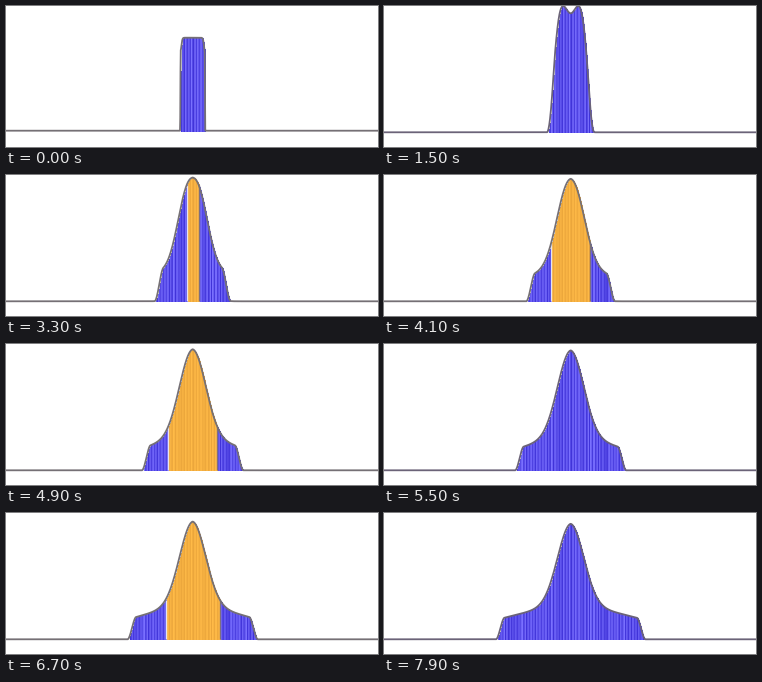
Animation of 372x141 px, one loop 8000 ms. Source, as a matplotlib script:

```python
import numpy as np
import matplotlib.pyplot as plt
from matplotlib.animation import FuncAnimation
from matplotlib.collections import LineCollection

W, H, DPI = 372, 141, 100
FRAMES, INTERVAL = 80, 100
MID = 186.7
START = 0.4
PX = 72 / DPI

BLUE, DARK_BLUE = np.array([0.48, 0.44, 1.0]), np.array([0.25, 0.20, 0.85])
ORANGE, DARK_ORANGE = np.array([1.0, 0.73, 0.28]), np.array([0.92, 0.65, 0.23])
GREY, VIOLET = (0.46, 0.44, 0.46), (0.42, 0.39, 0.47)

curve_x = np.arange(0, W + 0.25, 0.25)
columns_x = np.arange(W) + 0.5

# Fine vertical stripes: a three pixel rhythm with some noise
rng = np.random.default_rng(4)
stripe = 0.5 + 0.3 * np.cos(2 * np.pi * np.arange(W) / 3)
stripe = np.clip(stripe + rng.normal(0, 0.18, W), 0, 1)[:, None]


def pulse(x, t):
    """Height at x: a block that rounds into a bell on a spreading shelf."""
    t = 0 if t < START else t
    d = np.abs(x - MID)

    shelf = 38 + 42 * np.exp(-3 * t)
    rim = min(shelf, 20 + 71 * np.exp(-t / 1.6))
    edge = max(12.3, 7.3 + 8 * t)
    soft = 0.3 + 4 * min(1, t / 1.2)
    k = np.clip((edge + soft - d) / (2 * soft), 0, 1)
    base = (shelf + (rim - shelf) * d / edge) * k * k * (3 - 2 * k)

    peak = np.interp(t, [START, 1, 1.5, 3.3, 7.9], [93, 133, 131, 124, 115.5])
    power = 2 + 18 * np.exp(-1.155 * t)
    width = 18.5 - 7.2 * np.exp(-0.8 * t)
    bell = (peak - shelf) * np.exp(-(d / width) ** power)

    dip = 12 * np.exp(-((t - 1.5) / 0.9) ** 2) if t else 0
    return base + bell - dip * np.exp(-(d / 6.4) ** 2)


def core(t):
    """Half-width of the orange middle, zero while it is off."""
    lit = 3.2 <= t < 5.5 or 6.4 <= t < 7.3
    return 27.5 * (1 - np.exp(-(t - 3.1) / 0.8)) if lit else 0


def bars(x, heights, base):
    return [[(a, base), (a, base - b)] for a, b in zip(x, heights)]


fig = plt.figure(figsize=(W / DPI, H / DPI), dpi=DPI, facecolor="white")
ax = fig.add_axes([0, 0, 1, 1])
ax.set(xlim=(0, W), ylim=(H, 0))
ax.axis("off")

fill = ax.add_collection(LineCollection(
    [], linewidths=PX, capstyle="butt", antialiaseds=False))
borders = ax.add_collection(LineCollection(
    [], linewidths=1.3 * PX, capstyle="butt", colors=["#e6e2f2", "#7d6f80"]))
outline, = ax.plot([], [], lw=1.8 * PX, solid_joinstyle="round")


def draw(i):
    t = i * INTERVAL / 1000
    base = 124.7 if t < START else 126.3
    c = core(t)

    heights = pulse(columns_x, t)
    keep = heights > 0.5
    x, s = columns_x[keep], stripe[keep]
    inside = (np.abs(x - MID) < c)[:, None]
    fill.set_segments(bars(x, heights[keep], base))
    fill.set_color(np.where(inside, ORANGE + (DARK_ORANGE - ORANGE) * s,
                            BLUE + (DARK_BLUE - BLUE) * s))

    ends = MID + np.array([-c, c]) if c else np.array([])
    borders.set_segments(bars(ends, pulse(ends, t), base))

    outline.set_data(curve_x, base - pulse(curve_x, t))
    outline.set_color(GREY if t < START or c else VIOLET)
    return fill, borders, outline


anim = FuncAnimation(fig, draw, frames=FRAMES, interval=INTERVAL,
                     repeat=True, repeat_delay=0, blit=False)
plt.show()
```
